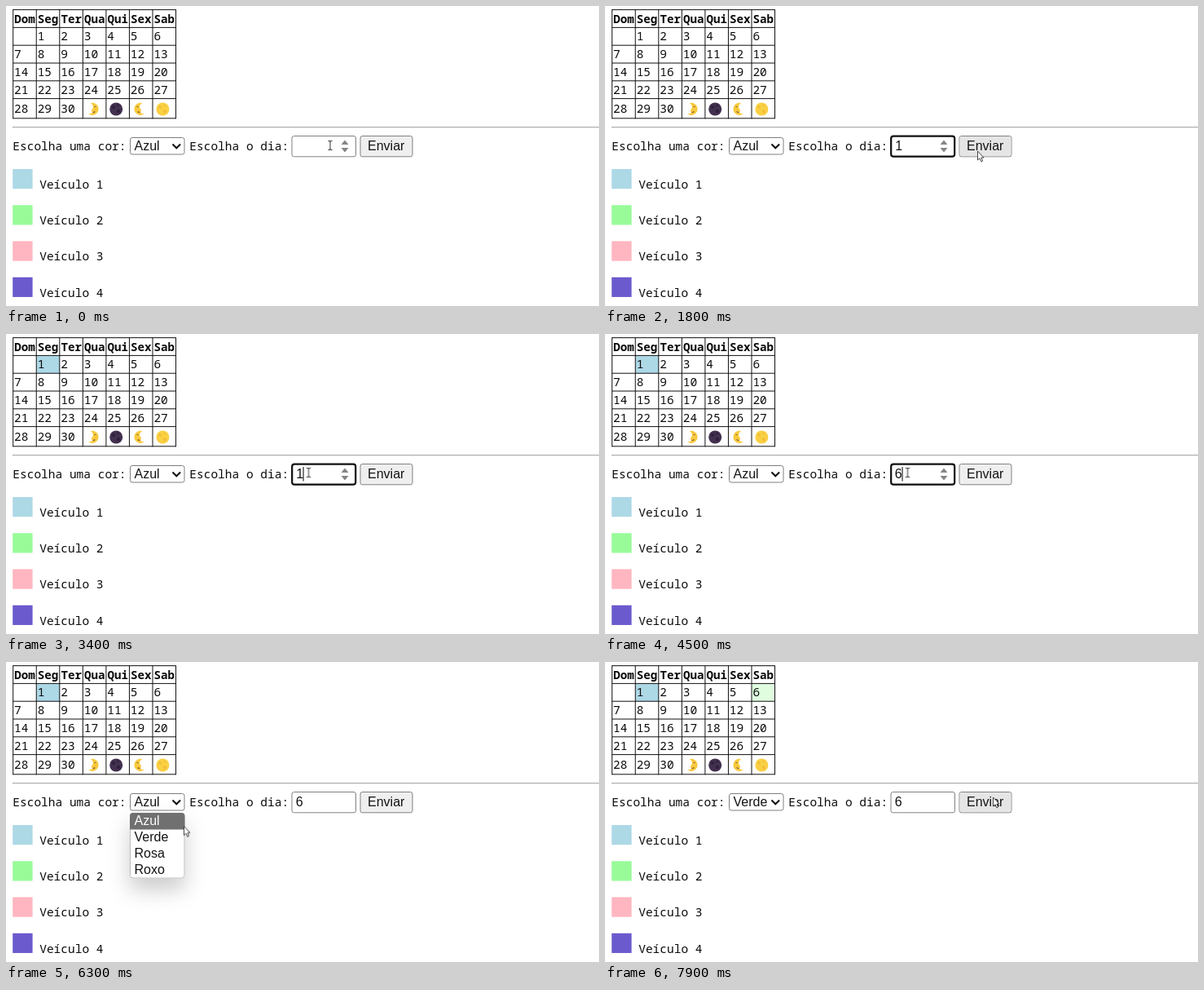
Write an HTML page that moves like this. It is 728 px wide and 368 px high and loops after 8000 ms.

```html
<!DOCTYPE html>
<html lang="pt">
<head>
<meta charset="utf-8">
<title>Calendário</title>
<style>
html, body { margin: 0; width: 100%; height: 100%; overflow: hidden; background: #fff; }
svg { display: block; width: 728px; height: 368px; }
text { white-space: pre; }
.mono { font: 14.5px "Noto Sans Mono", "DejaVu Sans Mono", monospace; fill: #0c0c0c; }
.mono .head { font-weight: 700; font-size: 14.2px; }
.ui { font: 16px "Liberation Sans", Arial, sans-serif; fill: #141414; }
.box { fill: #fff; stroke: #808080; }
.ring { fill: none; stroke: #101010; stroke-width: 2.2; }
.grid { fill: none; stroke: #111; }
.menu { filter: drop-shadow(0 14px 13px rgba(0, 0, 0, .2)); }

/* every change is a hard step on one shared 8 s clock */
.a { animation: 8s step-end infinite; }
#cell1 { animation-name: cell1; }
#cell6 { animation-name: cell6; }
#dayRing { animation-name: dayRing; }
#spin { animation-name: spin; }
#one { animation-name: one; }
#six { animation-name: six; }
#caret { animation-name: caret; }
#hover { animation-name: hover; }
#popup { animation-name: popup; }
#pickA { animation-name: pickA; }
#pickB { animation-name: pickB; }
#selRing { animation-name: selRing; }
#azul { animation-name: azul; }
#verde { animation-name: verde; }
#beam { animation-name: beam; }
#arrow { animation-name: arrow; }
#mouse { animation-name: mouse; }

@keyframes cell1 {
  0% { opacity: 0; } 27.5% { opacity: .3; } 28.75% { opacity: .68; }
  30% { opacity: .88; } 31.25% { opacity: .98; } 32.5%, 100% { opacity: 1; }
}
@keyframes cell6 { 0% { opacity: 0; } 98.75%, 100% { opacity: .3; } }
@keyframes dayRing { 0%, 26.25%, 75%, 100% { opacity: 0; } 7.5%, 42.5% { opacity: 1; } }
@keyframes spin { 0%, 35% { opacity: 1; } 26.25%, 75%, 100% { opacity: 0; } }
@keyframes one { 0%, 48.75%, 100% { opacity: 0; } 12.5% { opacity: 1; } }
@keyframes six { 0% { opacity: 0; } 50%, 100% { opacity: 1; } }
@keyframes caret {
  0%, 18.75%, 51.25%, 63.75%, 75%, 100% { opacity: 0; transform: none; }
  7.5%, 48.75% { opacity: 1; transform: none; }
  12.5%, 42.5%, 50%, 56.25%, 70% { opacity: 1; transform: translate(8px, 0); }
}
@keyframes hover { 0%, 35% { opacity: 0; } 21.25%, 90%, 100% { opacity: 1; } }
@keyframes popup { 0%, 85%, 100% { opacity: 0; } 75% { opacity: 1; } }
@keyframes pickA { 0% { opacity: 1; } 81.25%, 100% { opacity: 0; } }
@keyframes pickB { 0% { opacity: 0; } 81.25%, 100% { opacity: 1; } }
@keyframes selRing { 0%, 93.75%, 100% { opacity: 0; } 85% { opacity: 1; } }
@keyframes azul { 0% { opacity: 1; } 85%, 100% { opacity: 0; } }
@keyframes verde { 0% { opacity: 0; } 85%, 100% { opacity: 1; } }
@keyframes beam { 0%, 35% { opacity: 1; } 20%, 71.25%, 100% { opacity: 0; } }
@keyframes arrow { 0%, 35% { opacity: 0; } 20%, 71.25%, 100% { opacity: 1; } }
@keyframes mouse {
  0% { transform: translate(398px, 171px); }
  18.75% { transform: translate(408px, 172px); }
  20% { transform: translate(432px, 177px); }
  21.25% { transform: translate(450px, 178px); }
  22.5% { transform: translate(457px, 178px); }
  32.5% { transform: translate(448px, 178px); }
  33.75% { transform: translate(433.5px, 177.3px); }
  35% { transform: translate(405px, 175px); }
  36.25% { transform: translate(385px, 172px); }
  37.5% { transform: translate(376px, 171px); }
  38.75% { transform: translate(371.5px, 170px); }
  65% { transform: translate(362px, 172px); }
  66.25% { transform: translate(340px, 174px); }
  67.5% { transform: translate(305px, 175px); }
  68.75% { transform: translate(265px, 174px); }
  70% { transform: translate(230px, 173px); }
  71.25% { transform: translate(214px, 173px); }
  72.5% { transform: translate(210px, 173px); }
  76.25% { transform: translate(213px, 186px); }
  77.5% { transform: translate(217px, 198px); }
  78.75% { transform: translate(218px, 201.5px); }
  81.25% { transform: translate(217px, 206px); }
  82.5% { transform: translate(215px, 209px); }
  86.25% { transform: translate(225px, 209px); }
  87.5% { transform: translate(345px, 199px); }
  88.75% { transform: translate(444px, 189px); }
  90% { transform: translate(462px, 178px); }
  91.25% { transform: translate(471px, 170px); }
  92.5% { transform: translate(475px, 167px); }
  93.75%, 100% { transform: translate(476px, 166px); }
}
</style>
</head>
<body>
<svg viewBox="0 0 728 368">
  <defs>
    <g id="moon">
      <path d="M104 119A7.600 7.600 0 1 1 101.200 132.300Q104.500 132.500 106 130.800L104.800 128.200 106.800 125Q107.500 121.500 104 119Z" fill="#f8c93e"/>
      <path d="M108.500 123.500h2M106.500 130.300q1.800 .5 2.800-.9" stroke="#7d5a2c" stroke-width="1.100" fill="none"/>
    </g>
  </defs>

  <!-- calendar -->
  <rect id="cell1" class="a" x="37.500" y="26.500" width="28.500" height="21.800" fill="#add8e6"/>
  <rect id="cell6" class="a" x="180" y="26.500" width="28.500" height="21.800" fill="#98fb98"/>
  <g id="grid" class="grid"></g>
  <g id="days" class="mono"></g>
  <use href="#moon"/>
  <circle cx="135.200" cy="126.500" r="8" fill="#42304f"/>
  <g fill="#2f203d"><circle cx="132" cy="124" r="2"/><circle cx="138" cy="129" r="2.200"/><circle cx="137.500" cy="122" r="1.200"/></g>
  <use href="#moon" transform="translate(271 0) scale(-1 1)"/>
  <circle cx="192.400" cy="126.500" r="8" fill="#fad043"/>
  <g fill="#f2bd37"><circle cx="189" cy="124" r="1.800"/><circle cx="195" cy="129.500" r="2"/><circle cx="194.500" cy="122" r="1.200"/></g>
  <path d="M8 148.700H728" stroke="#b0b0b0" stroke-width="1.300"/>

  <!-- vehicles -->
  <g id="cars" class="mono"></g>

  <!-- form -->
  <g class="mono">
    <text x="8.300" y="177">Escolha uma cor:</text>
    <text x="225.300" y="177">Escolha o dia:</text>
  </g>
  <g class="ui">
    <rect class="box" x="152.500" y="161.500" width="66.500" height="20.500" rx="2.500"/>
    <rect id="selRing" class="a ring" x="152.200" y="161.200" width="66.800" height="20.600" rx="3"/>
    <text id="azul" class="a" x="157.500" y="177">Azul</text>
    <text id="verde" class="a" x="157.500" y="177">Verde</text>
    <path d="M204.500 169.500l4.800 4.800 4.800-4.800" fill="none" stroke="#111" stroke-width="2"/>

    <rect class="box" x="351" y="159.500" width="78.500" height="25.300" rx="2.500"/>
    <rect id="dayRing" class="a ring" x="351.200" y="159.700" width="78" height="25" rx="3"/>
    <text id="one" class="a" x="356.200" y="177">1</text>
    <text id="six" class="a" x="355.700" y="177">6</text>
    <rect id="caret" class="a" x="356.500" y="163" width="1.100" height="17.500"/>
    <path id="spin" class="a" d="M411.500 170l4.500-5.500 4.500 5.500zM411.500 174h9l-4.500 5.500z" fill="#858585"/>

    <rect class="box" x="435" y="159.500" width="64" height="25.300" rx="2.500" style="fill:#efefef"/>
    <rect id="hover" class="a" x="435.500" y="160" width="63" height="24.300" rx="2" fill="#e5e5e5"/>
    <text x="444" y="177">Enviar</text>

    <g id="popup" class="a">
      <rect class="menu" x="152" y="185" width="67.500" height="80.500" rx="4" fill="#fff"/>
      <rect x="152.500" y="185.500" width="66.500" height="79.500" rx="3.500" fill="#fff" stroke="#bdbdbd"/>
      <text x="157.500" y="200">Azul</text>
      <text x="157.500" y="220">Verde</text>
      <text x="157.500" y="239.500">Rosa</text>
      <text x="157.500" y="259.500">Roxo</text>
      <g id="pickA" class="a">
        <path d="M152 205.500V189q0-4 4-4h59.500q4 0 4 4v16.500z" fill="#707070"/>
        <text x="157.500" y="200" fill="#fff">Azul</text>
      </g>
      <g id="pickB" class="a">
        <rect x="152" y="205.500" width="67.500" height="19.500" fill="#707070"/>
        <text x="157.500" y="220" fill="#fff">Verde</text>
      </g>
    </g>
  </g>

  <!-- pointer -->
  <g id="mouse" class="a">
    <path id="beam" class="a" d="M-2.500-5.500H-1Q0-5.500 0-4.500Q0-5.500 1-5.500H2.500M0-5V5M-2.500 5.500H-1Q0 5.500 0 4.500Q0 5.500 1 5.500H2.500" fill="none" stroke="#333"/>
    <path id="arrow" class="a" d="M.5 0V11L3 8.700 4.800 12.800 6.600 12 4.900 8H8z" fill="#fff" stroke="#333" stroke-width=".9"/>
  </g>
</svg>
<script>
const byId = id => document.getElementById(id);
const put = (parent, tag, attrs, label = '') => {
  const el = document.createElementNS('http://www.w3.org/2000/svg', tag);
  for (const key in attrs) el.setAttribute(key, attrs[key]);
  el.textContent = label;
  parent.append(el);
};

const colW = 28.55, rowH = 21.8;
const left = 8.7, top0 = 4.6, right = left + 7 * colW, bottom = 137.8;
const grid = byId('grid');
for (let col = 0; col < 8; col++)
  put(grid, 'path', { d: `M${left + col * colW} ${top0 - .5}V${bottom + .5}` });
for (let row = 0; row < 7; row++)
  put(grid, 'path', { d: `M${left} ${row < 6 ? top0 + row * rowH : bottom}H${right}` });

const days = byId('days');
const colX = col => left + 1.4 + col * colW;
const rowY = row => 42.3 + row * rowH + (row === 4 ? 1.4 : 0);
['Dom', 'Seg', 'Ter', 'Qua', 'Qui', 'Sex', 'Sab'].forEach((name, col) =>
  put(days, 'text', { x: colX(col) + .2, y: 20.8, class: 'head' }, name));
for (let day = 1; day <= 30; day++)
  put(days, 'text', { x: colX(day % 7), y: rowY(Math.floor(day / 7)) }, day);

const cars = byId('cars');
['#add8e6', '#98fb98', '#ffb6c1', '#6a5acd'].forEach((fill, i) => {
  const y = 200 + i * 44.25;
  put(cars, 'rect', { x: 8.2, y, width: 24.4, height: 24.2, fill });
  put(cars, 'text', { x: 41.2, y: y + 23.8 }, 'Veículo ' + (i + 1));
});
</script>
</body>
</html>
```
